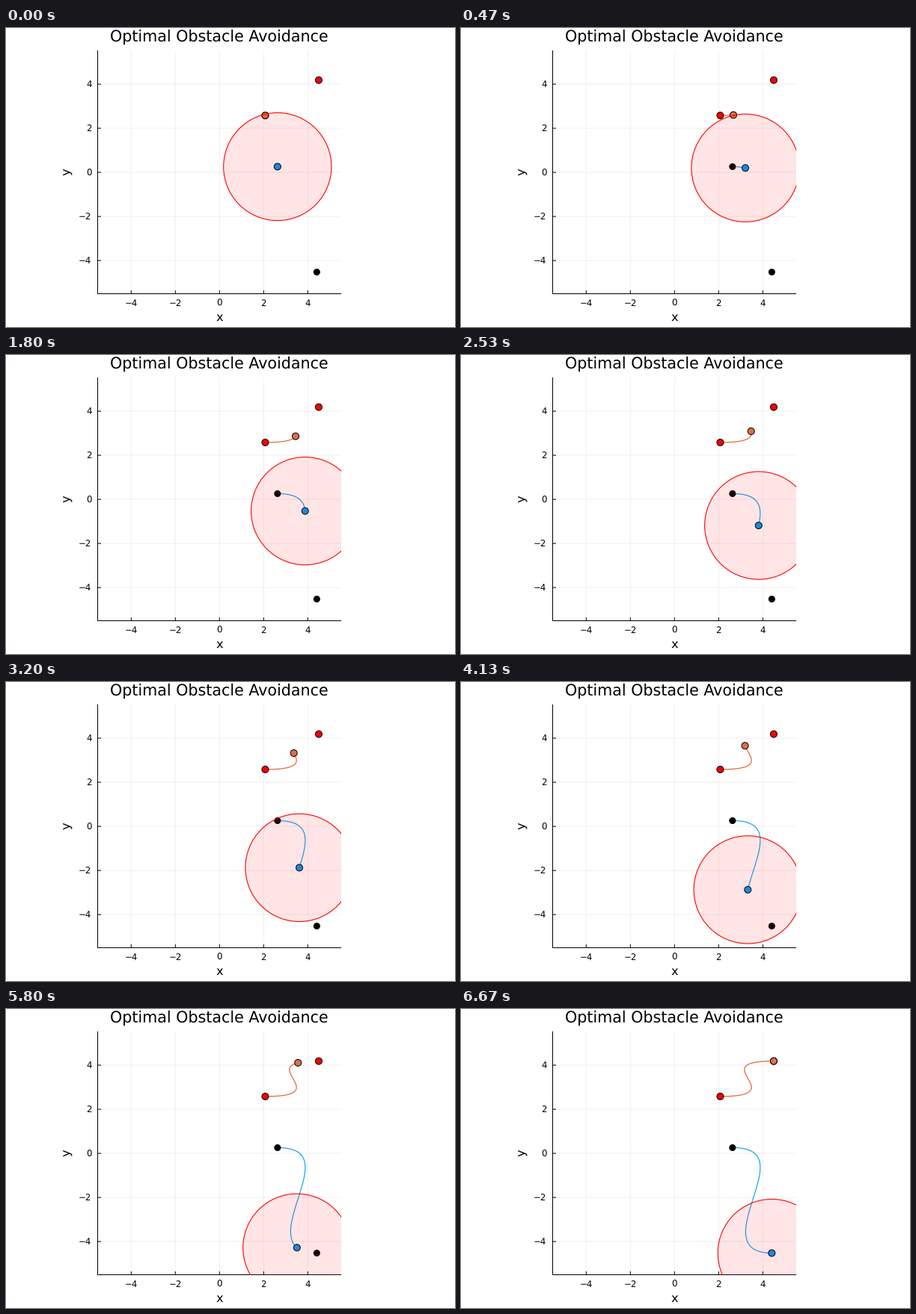
A matplotlib script that plays this animation: 600 px wide and 400 px high, repeating every 6740 ms.

```python
import matplotlib.pyplot as plt
import numpy as np
from matplotlib.animation import FuncAnimation
from matplotlib.patches import Circle, Rectangle

W, H, DPI = 600, 400, 100
STEPS, STEPS_PER_MS = 101, 0.015
LOOP_MS, TICK_MS = 6740, 20
LEFT, RIGHT, TOP, BOTTOM = 122.5, 447.5, 30.5, 355.5
CX, CY, UNIT = 285.3, 193.1, 29.5
RADIUS = 72.1
BLUE, ORANGE = "#009afa", "#e26f46"

plt.rcParams["font.family"] = "DejaVu Sans"
plt.rcParams["text.hinting"] = "none"


def px(n):
    """Pixels to points."""
    return n * 72 / DPI


def drive(start, goal, speed, bump):
    """Cubic path leaving and arriving at the same horizontal speed,
    pushed sideways by a bump that peaks halfway."""
    t = np.linspace(0, 1, STEPS)[:, None]
    start, goal = np.array(start), np.array(goal)
    ease = t * t * (3 - 2 * t)
    swing = t * (1 - t) * (1 - 2 * t) * np.array([speed, 0])
    return start + (goal - start) * ease + swing \
        + np.array(bump) * (4 * t * (1 - t)) ** 2


agent = drive((362.8, 185.5), (415.3, 326.5), 292, (1.6, -3.4))
rover = drive((346.4, 117.0), (417.9, 69.7), 295, (1.65, 0.3))

fig = plt.figure(figsize=(W / DPI, H / DPI), dpi=DPI, facecolor="white")
ax = fig.add_axes([0, 0, 1, 1])
ax.set_xlim(0, W)
ax.set_ylim(H, 0)
ax.axis("off")


def line(xs, ys, color="black", width=1.0, **kw):
    return ax.plot(xs, ys, color=color, lw=px(width), snap=False, **kw)[0]


def label(x, y, text, size, ha="center", **kw):
    ax.text(x, y, text, fontsize=px(size), ha=ha, va="baseline", **kw)


def dot(point, color, z, radius=4.5):
    return ax.add_patch(Circle(point, radius, fc=color, ec="black",
                               lw=px(1), zorder=z))


# Grid, ticks and frame
for v in range(-4, 5, 2):
    gx, gy = CX + v * UNIT, CY - v * UNIT
    line([gx, gx], [TOP, BOTTOM], alpha=0.06, zorder=1)
    line([LEFT, RIGHT], [gy, gy], alpha=0.06, zorder=1)
    line([gx, gx], [BOTTOM - 4, BOTTOM], zorder=2)
    line([LEFT, LEFT + 4], [gy, gy], zorder=2)
    name = str(v).replace("-", "\u2212")
    label(gx, 371.5, name, 11.8)
    label(114.5, gy + 4.3, name, 11.8, ha="right")
line([LEFT, LEFT, RIGHT], [TOP, BOTTOM, BOTTOM], zorder=2)

label(285, 19, "Optimal Obstacle Avoidance", 20.7)
label(285, 391.5, "x", 16.2)
label(86, 192.6, "y", 16.2, rotation=90, rotation_mode="anchor")

# Start and goal markers
for end in (0, -1):
    dot(agent[end], "black", 4, radius=4)
    dot(rover[end], "red", 4)

agent_trail = line([], [], BLUE, 1.1, zorder=3)
rover_trail = line([], [], ORANGE, 1.3, zorder=3)
agent_dot = dot(agent[0], BLUE, 5)
rover_dot = dot(rover[0], ORANGE, 5)

plot_area = Rectangle((LEFT, TOP), RIGHT - LEFT, BOTTOM - TOP,
                      transform=ax.transData)
zone = ax.add_patch(Circle(agent[0], RADIUS, fc=(1, 0, 0, 0.1), ec="red",
                           lw=px(1.1), zorder=6))
zone.set_clip_path(plot_area)


def update(k):
    # Poses hold for 60 or 70 ms, so they change on a finer clock
    i = min(int((k * TICK_MS + 15) * STEPS_PER_MS), STEPS - 1)
    for path, trail, marker in ((agent, agent_trail, agent_dot),
                                (rover, rover_trail, rover_dot)):
        trail.set_data(path[:i + 1, 0], path[:i + 1, 1])
        marker.center = tuple(path[i])
    zone.center = tuple(agent[i])
    return agent_trail, rover_trail, agent_dot, rover_dot, zone


anim = FuncAnimation(fig, update, frames=LOOP_MS // TICK_MS,
                     interval=TICK_MS, repeat=True, repeat_delay=0)
plt.show()
```
